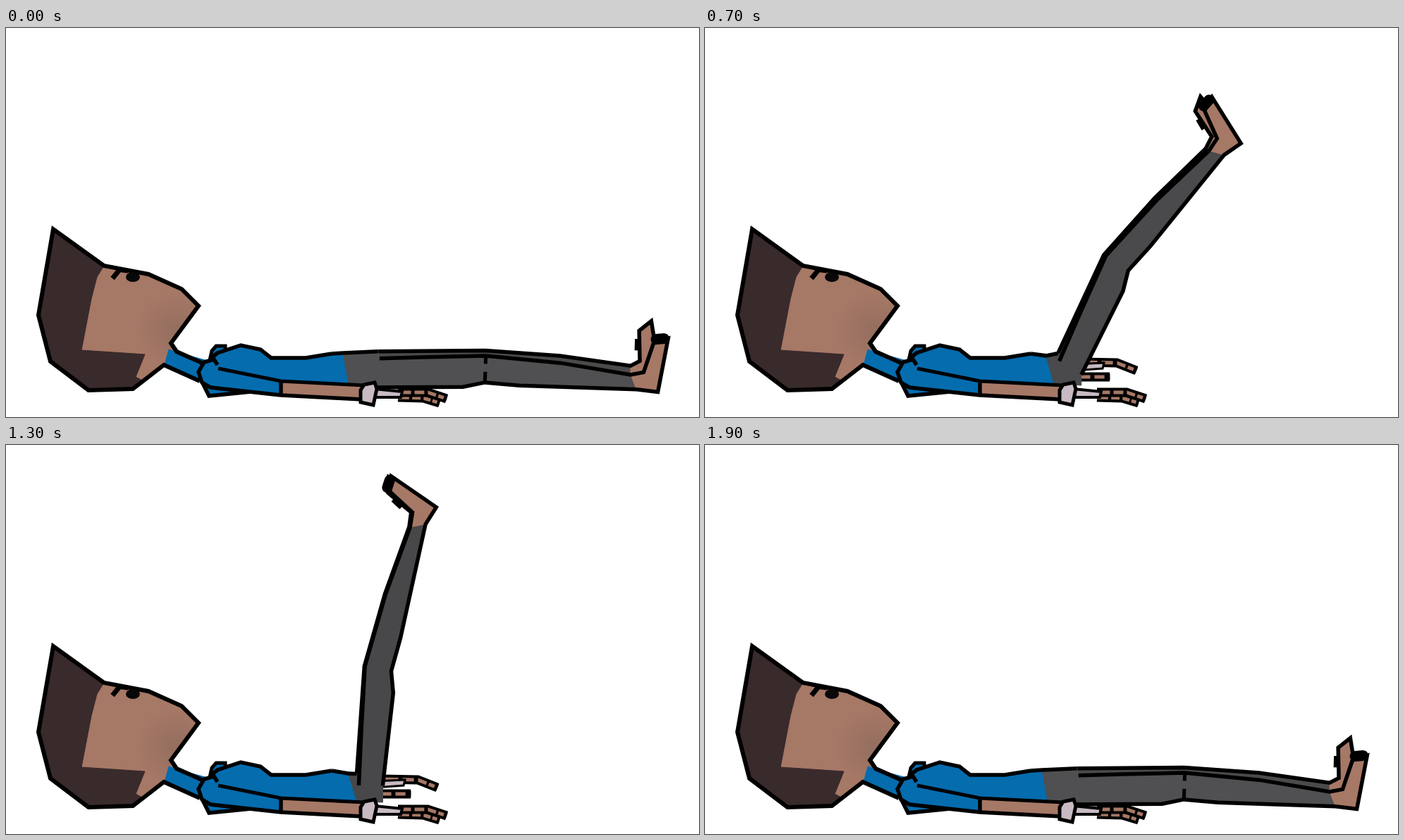
An HTML page with a canvas for the animation above (2000 ms loop, 983 by 553 pixels).

```html
<!DOCTYPE html>
<html lang="en">
<head>
<meta charset="utf-8">
<title>Leg raise</title>
<style>
  html, body { margin: 0; width: 100%; height: 100%; overflow: hidden; background: #fff; }
  canvas { display: block; width: 983px; height: 553px; }
</style>
</head>
<body>
<canvas id="stage" width="983" height="553"></canvas>
<script>
const ctx = document.getElementById('stage').getContext('2d');
const LOOP = 2000, STEP = 100;
const HIP = [510, 487], THIGH = 170, SHIN = 214;
const SKIN = '#a67866', HAIR = '#392a2c', BLUE = '#056cae', CUFF = '#c8bac2', INK = '#000';

// Time, thigh angle and shin angle in degrees.
const KEYS = [
  [100, 0.7, -5], [400, 9, 2], [700, 64, 48], [900, 103, 82],
  [1050, 111, 90], [1300, 84, 74.5], [1500, 34, 30], [1900, 0.7, -5]
];

// Cubic through the keys, flat at both ends.
function sample(t, col) {
  const last = KEYS.length - 1;
  const time = n => KEYS[n][0], value = n => KEYS[n][col];
  const slope = n => {
    if (n === 0 || n === last) return 0;
    const a = time(n) - time(n - 1), b = time(n + 1) - time(n);
    return ((value(n) - value(n - 1)) * b / a + (value(n + 1) - value(n)) * a / b) / (a + b);
  };
  let i = 0;
  while (i < last - 1 && t >= time(i + 1)) i++;
  const h = time(i + 1) - time(i);
  const u = t < 200 ? 0 : Math.min(1, (t - time(i)) / h), w = 1 - u;
  return w * w * (1 + 2 * u) * value(i) + u * u * (3 - 2 * u) * value(i + 1) +
    h * u * w * (w * slope(i) - u * slope(i + 1));
}

const mix = (p, q, k) => p.map((v, i) => v + (q[i] - v) * k);

// A frame on a bone: distance along it, and out towards its front.
function bone([x, y], degrees) {
  const a = degrees * Math.PI / 180, c = Math.cos(a), s = Math.sin(a);
  return (along, out = 0) => [x + along * c - out * s, y - along * s - out * c];
}

function pairs(list) {
  const out = [];
  for (let i = 0; i < list.length; i += 2) out.push([list[i], list[i + 1]]);
  return out;
}
function trace(points, close) {
  ctx.beginPath();
  points.forEach(([x, y]) => ctx.lineTo(x, y));
  if (close) ctx.closePath();
}
function line(points, width = 5.5, color = INK) {
  trace(points);
  ctx.lineWidth = width;
  ctx.strokeStyle = color;
  ctx.stroke();
}
function fill(points, color) {
  trace(points, true);
  ctx.fillStyle = ctx.strokeStyle = color;
  ctx.lineWidth = 1;
  ctx.fill();
  ctx.stroke();
}
function shape(list, color, width = 5) {
  const p = pairs(list);
  fill(p, color);
  line([...p, p[0], p[1]], width);
}
const ink = (list, width) => line(pairs(list), width);

function drawHead() {
  const crown = [180,513, 117,515, 63,474, 46,408, 67,286, 139,338];
  const face = [202,350, 249,371, 273,395, 234,448, 242,460];
  const shade = ctx.createRadialGradient(240, 430, 5, 240, 430, 55);
  shade.addColorStop(0, '#966f60');
  shade.addColorStop(1, SKIN);
  fill(pairs([...face, 225,480, ...crown]), shade);
  fill(pairs([...crown, 129,354, 121,385, 107,458, 197,464, 184,496, 195,502]), HAIR);
  fill(pairs([231,457, 242,461, 290,474, 285,505, 225,479]), BLUE);
  ink([275,502, 224,479, ...crown, ...face, 278,476], 6);
  ink([151,356, 160,345], 7);
  ink([157,344, 173,346], 5);
  ctx.beginPath();
  ctx.ellipse(180, 354, 10, 7, 0, 0, 7);
  ctx.fillStyle = '#080808';
  ctx.fill();
}

function finger(list) {
  const p = pairs(list), end = p.length - 1;
  line(p, 13);
  line([...p.slice(0, end), mix(p[end - 1], p[end], 0.85)], 5, SKIN);
  for (let i = 0; i < end; i++) {
    for (const k of [0.5, 0.95]) line([mix(p[i], p[i + 1], k - 0.06), mix(p[i], p[i + 1], k + 0.06)], 9);
  }
}

function drawFarHand() {
  finger([525,496, 574,496]);
  finger([535,475, 584,476, 612,487]);
  shape([525,478, 566,476, 564,484, 525,487], CUFF, 3);
}

function drawTorso() {
  const chest = [290,470, 300,462, 333,451, 361,457, 376,469, 425,469, 462,463];
  shape([289,472, 292,459, 298,452, 311,452, 312,470], BLUE);
  fill(pairs([275,480, ...chest, 500,466, 503,507, 348,517, 288,524, 277,503]), BLUE);
  ink(chest);
  ink([278,503, 288,523, 348,517]);
}

function drawArm() {
  const shoulder = [300,479, 295,471, 281,475, 273,489, 278,504, 290,511, 390,522];
  fill(pairs([...shoulder, 390,502, 302,485]), BLUE);
  fill(pairs([391,502, 508,509, 505,528, 391,522]), SKIN);
  ink([...shoulder, 505,528]);
  ink([301,484, 390,502, 508,508], 5);
  ink([390,502, 390,523]);
  finger([556,525, 592,526, 615,533]);
  finger([556,518, 598,518, 625,527]);
  shape([522,513, 562,517, 560,525, 520,525], CUFF, 4);
  shape([508,507, 523,504, 526,513, 521,536, 503,532, 503,515], CUFF);
}

// Outline of one leg; "turn" tells how far it is seen from the side.
function makeLeg(thighAngle, shinAngle, footAngle, turn) {
  const thigh = bone(HIP, thighAngle), knee = thigh(THIGH);
  const bend = bone(knee, (thighAngle + shinAngle) / 2);
  const shin = bone(knee, shinAngle), foot = bone(shin(SHIN), footAngle);
  return {
    thigh, foot,
    front: [thigh(20 * turn, 9 + 8 * turn), thigh(80, 14 + 4 * turn), bend(0, 19), shin(105, 18), shin(206, 10)],
    foot3: [foot(18, -2), foot(60, 8), foot(77, -6), foot(5, -34)],
    back: [shin(216, -10), shin(50, -19), bend(0, -19), thigh(138, -25), thigh(5, -24)]
  };
}

function drawLegs(t) {
  const a = sample(t, 1), b = sample(t, 2), c = b + 63 - a * 0.16;
  const turn = Math.max(0, Math.cos(a * Math.PI / 180)), lift = Math.min(1, a / 100);
  const near = makeLeg(a, b, c, turn);
  const far = makeLeg(a + 2.5 * turn, b + 1.5 * turn, c + 20 * turn, turn);
  const gray = v => `rgb(${v},${v - 1},${v + 1})`, tone = Math.round(80 - 10 * lift);
  const fold = near.thigh(18, 13 + 14 * turn);
  const waist = [478 + 9 * lift, 462 + 6 * lift];
  const [, , kneeFront, , ankle] = near.front, kneeBack = near.back[2], seat = near.back[4];

  const farTop = [fold, ...far.front.slice(2)];
  fill([...farTop, ...near.front.slice().reverse()], gray(tone - 6));
  fill([far.front[4], ...far.foot3, ankle], SKIN);
  line([...farTop, ...far.foot3]);
  line([far.foot(32, 4), far.foot(48, 7)], 9);

  fill([waist, fold, near.front[0], seat, [seat[0], 508], [486 + 14 * lift, 506]], gray(tone));
  fill([...near.front, ...near.back], gray(tone));
  fill([ankle, ...near.foot3, near.back[0]], SKIN);
  line([[462, 463], waist, fold]);
  line([...near.front, ...near.foot3, ...near.back]);
  ctx.lineCap = 'round';
  line([near.foot(67, 8), near.foot(74, -1)], 15);
  ctx.lineCap = 'butt';

  // Knee seam, hidden while the leg is turned away.
  if (turn > 0.6) {
    line([kneeFront, mix(kneeFront, kneeBack, 0.3)], 5);
    line([mix(kneeFront, kneeBack, 0.6), kneeBack], 5);
  }
}

function draw(t) {
  ctx.fillStyle = '#fff';
  ctx.fillRect(0, 0, 983, 553);
  ctx.miterLimit = 3;
  drawHead();
  drawFarHand();
  drawTorso();
  drawLegs(t);
  drawArm();
}

let shown = -1;
function tick(now) {
  const t = Math.floor(now % LOOP / STEP) * STEP;
  if (t !== shown) draw(shown = t);
  requestAnimationFrame(tick);
}
tick(performance.now());
</script>
</body>
</html>
```
